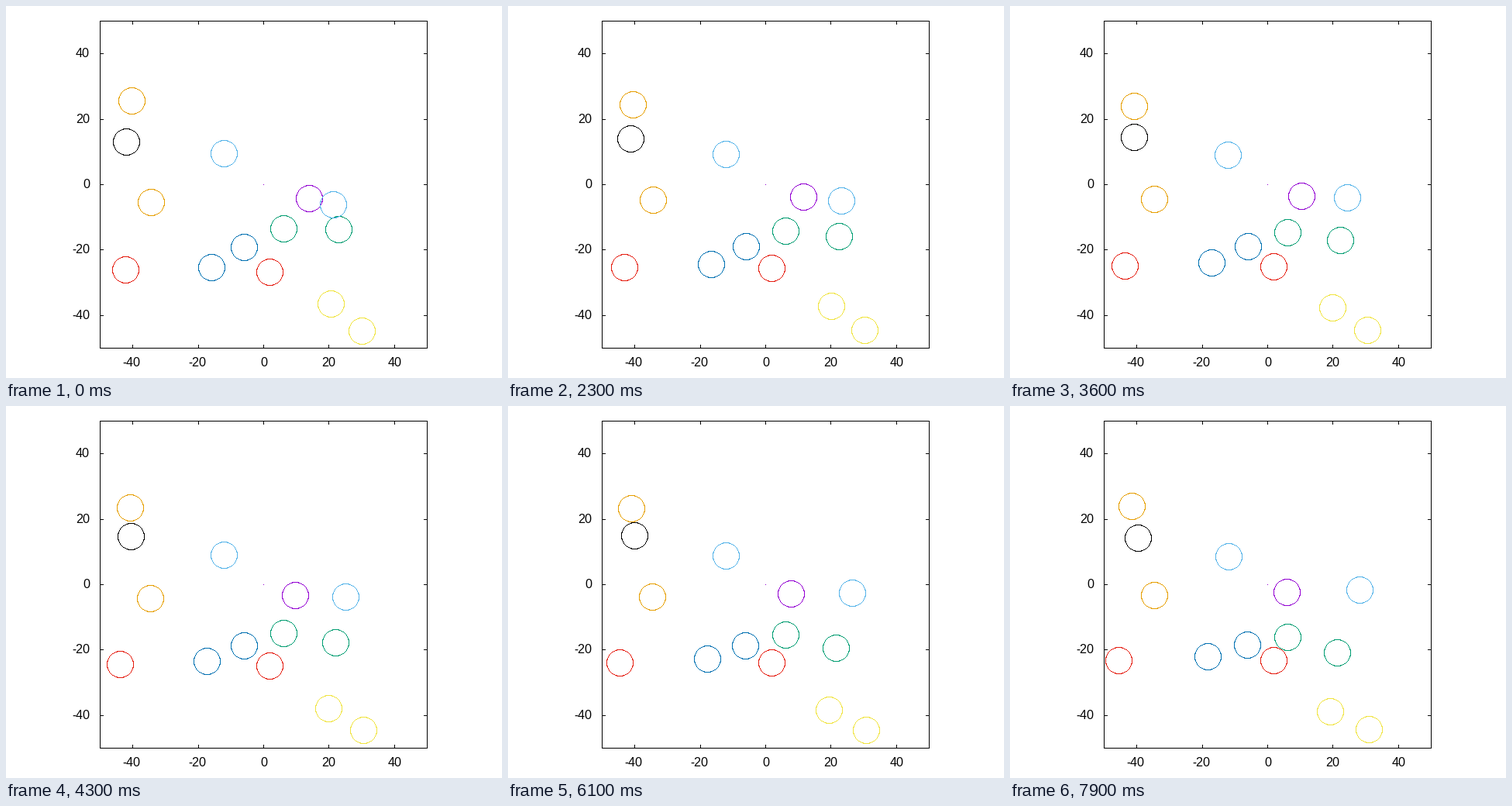
These frames come from a looping animation (640x480 px, 8 s). A matplotlib script:

```python
import numpy as np
import matplotlib.pyplot as plt
from matplotlib.animation import FuncAnimation

plt.rcParams.update({"text.hinting": "native", "text.hinting_factor": 1})

W, H, DPI = 640, 480, 100
FRAMES, STEP_MS = 80, 100
LEFT, TOP, RIGHT, BOTTOM = 121, 19, 543, 441
CX, CY, SCALE = 332, 230, 4.22
RADIUS = 4 * SCALE
TICK = 4
BOUNCE = 54.5

PURPLE, GREEN, SKY = (148, 0, 211), (0, 158, 115), (86, 180, 233)
ORANGE, YELLOW, BLUE = (230, 159, 0), (240, 228, 66), (0, 114, 178)
RED, BLACK = (229, 30, 16), (0, 0, 0)

# colour, start x, y, velocity x, y (pixels per step)
FREE = [
    (PURPLE, 391.0, 248.4, -0.427, -0.104),
    (GREEN, 428.6, 288.3, -0.085, 0.382),
    (GREEN, 357.9, 286.6, -0.004, 0.143),
    (SKY, 421.8, 256.1, 0.367, -0.243),
    (SKY, 280.7, 190.2, 0.011, 0.042),
    (ORANGE, 186.8, 253.1, -0.010, -0.120),
    (YELLOW, 458.5, 419.0, 0.060, -0.0222),
    (YELLOW, 418.9, 384.3, -0.079, 0.122),
    (BLUE, 307.3, 310.7, -0.015, -0.033),
    (BLUE, 264.6, 337.3, -0.127, -0.187),
    (RED, 154.2, 340.2, -0.175, -0.158),
    (RED, 339.5, 342.8, 0.010, -0.193),
]

# the colliding pair: colour, start, velocity before, velocity after
PAIR = [
    (ORANGE, (162.2, 122.1), (-0.058, 0.196), (-0.079, -0.170)),
    (BLACK, (155.3, 175.2), (0.122, -0.170), (0.144, 0.185)),
]


def to_px(value):
    return np.floor(np.asarray(value) + 0.5).astype(int)


def ring(radius):
    """Pixel offsets of a circle drawn as a 120-sided polyline."""
    a = np.radians(np.arange(0, 361, 3))
    xs, ys = np.rint(radius * np.cos(a)), np.rint(radius * np.sin(a))
    pixels = set()
    for x0, y0, x1, y1 in zip(xs, ys, xs[1:], ys[1:]):
        s = np.linspace(0, 1, int(max(abs(x1 - x0), abs(y1 - y0))) + 1)
        pixels.update(zip(to_px(x0 + (x1 - x0) * s), to_px(y0 + (y1 - y0) * s)))
    return np.array(sorted(pixels)).T


def make_backdrop():
    img = np.full((H, W, 3), 255, np.uint8)
    img[[TOP, BOTTOM], LEFT:RIGHT + 1] = 0
    img[TOP:BOTTOM + 1, [LEFT, RIGHT]] = 0
    for v in range(-40, 41, 20):
        x, y = to_px(CX + v * SCALE), to_px(CY - v * SCALE)
        img[TOP:TOP + TICK + 1, x] = 0
        img[BOTTOM - TICK:BOTTOM + 1, x] = 0
        img[y, LEFT:LEFT + TICK + 1] = 0
        img[y, RIGHT - TICK:RIGHT + 1] = 0
    img[CY, CX] = PURPLE
    return img


def discs(t):
    for color, x, y, vx, vy in FREE:
        yield color, x + vx * t, y + vy * t
    before, after = min(t, BOUNCE), max(t - BOUNCE, 0)
    for color, (x, y), (ux, uy), (vx, vy) in PAIR:
        yield color, x + ux * before + vx * after, y + uy * before + vy * after


RING_X, RING_Y = ring(RADIUS)
BACKDROP = make_backdrop()


def render(t):
    img = BACKDROP.copy()
    for color, x, y in discs(t):
        img[to_px(y) + RING_Y, to_px(x) + RING_X] = color
    return img


fig = plt.figure(figsize=(W / DPI, H / DPI), dpi=DPI, facecolor="white")
ax = fig.add_axes([0, 0, 1, 1])
ax.axis("off")
picture = ax.imshow(render(0), extent=(0, W, H, 0), interpolation="nearest",
                    aspect="auto")
ax.set_xlim(0, W)
ax.set_ylim(H, 0)

font = dict(family="Liberation Sans", size=16 * 72 / DPI, color="black",
            va="baseline")
for v in range(-40, 41, 20):
    shift = 1.5 if v < 0 else -0.5
    ax.text(to_px(CX + v * SCALE) - shift, 465, str(v), ha="center", **font)
    ax.text(108, to_px(CY - v * SCALE) + 5, str(v), ha="right", **font)


def update(i):
    picture.set_data(render(i))
    return [picture]


anim = FuncAnimation(fig, update, frames=FRAMES, interval=STEP_MS,
                     repeat=True, repeat_delay=0, blit=False)
plt.show()
```
